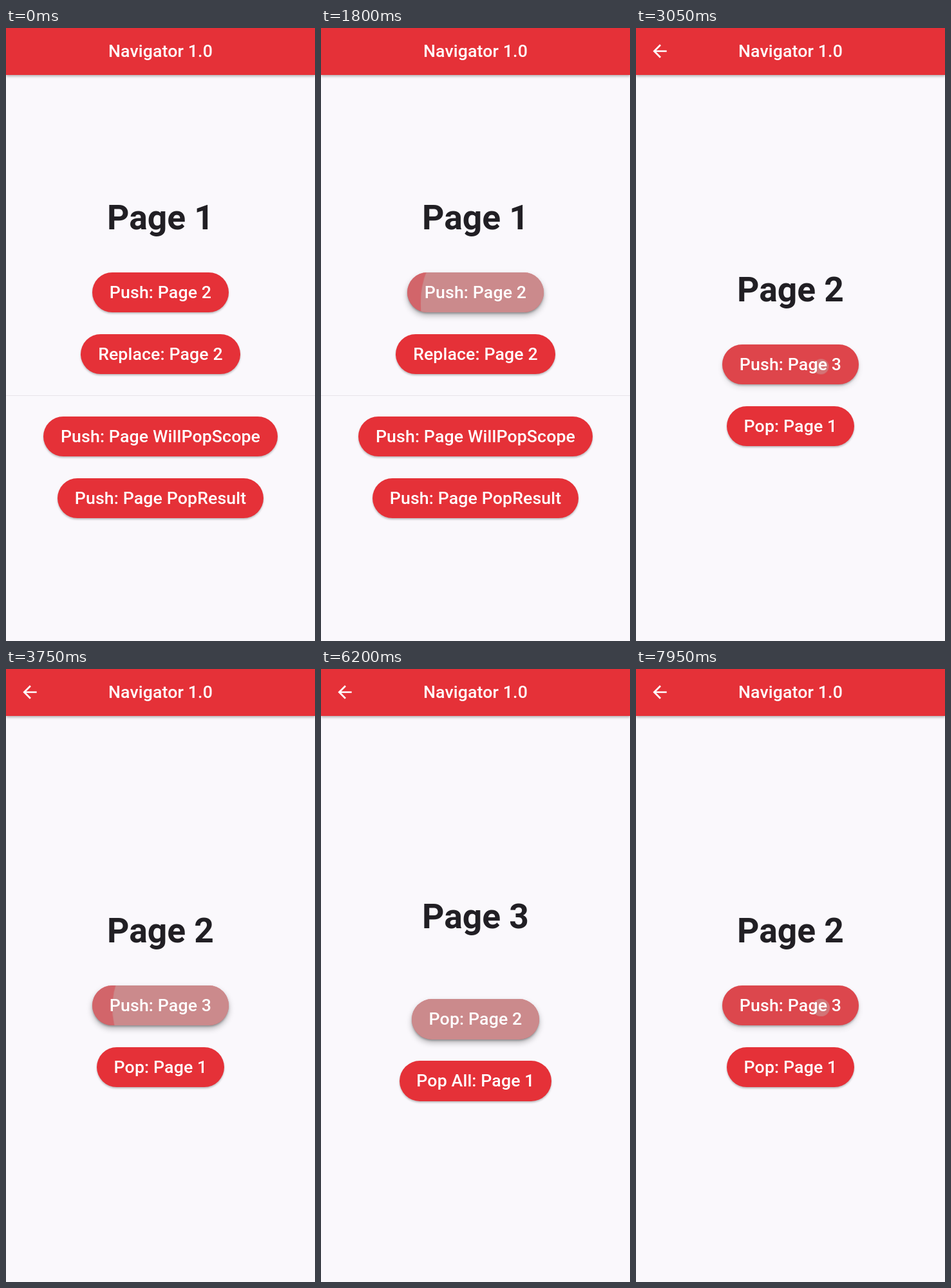
Recreate the animation shown at these times as an HTML page. Size 480 px wide and 953 px high, loop 8 s.

```html
<!DOCTYPE html>
<html lang="en">
<head>
<meta charset="utf-8">
<title>Navigator 1.0</title>
<style>
  :root { --red: #e53138; --paper: #faf8fc; --loop: 8s; }
  html, body { margin: 0; width: 100%; height: 100%; overflow: hidden; background: var(--paper); }
  .stage { position: relative; width: 480px; height: 953px; overflow: hidden; }
  .page { position: absolute; inset: 0; background: var(--paper); font: 500 26.67px/1.2 Roboto, sans-serif; letter-spacing: .133px; white-space: nowrap; }

  .bar {
    position: absolute; left: 0; right: 0; top: 0; height: 73px;
    background: var(--red); color: #fff; text-align: center; line-height: 73px;
    box-shadow: 0 1.5px 4px rgba(0, 0, 0, .3);
  }
  .bar svg { position: absolute; left: 21.4px; top: 20.3px; width: 32px; height: 32px; fill: #fff; }
  h1 {
    position: absolute; left: 0; right: 0; top: var(--y); margin: 0;
    text-align: center; color: #211f24;
    font-size: 53.33px; font-weight: 700; line-height: 62.5px; letter-spacing: 0;
  }
  hr { position: absolute; left: 0; right: 0; top: 570.5px; height: 1.3px; margin: 0; border: 0; background: #e7e4e9; }

  .btn {
    position: absolute; left: 0; right: 0; top: var(--y); width: fit-content; height: 62.6px;
    margin: 0 auto; padding: 0 26.67px; border-radius: 32px;
    background: var(--red); color: #fff; line-height: 62.6px;
    box-shadow: 0 2px 3px rgba(0, 0, 0, .25);
  }
  .btn span { position: relative; }
  .lift, .ink, .tint { position: absolute; inset: 0; border-radius: inherit; }
  .lift { box-shadow: 0 5px 10px rgba(0, 0, 0, .27); }
  .ink { overflow: hidden; }
  .tint { background: rgba(172, 210, 210, .33); }
  .splash {
    position: absolute; left: calc(var(--cx) - var(--r)); top: calc(var(--cy) - var(--r));
    width: calc(2 * var(--r)); height: calc(2 * var(--r));
    border-radius: 50%; background: rgba(190, 224, 217, .3);
  }

  /* Pressed look: highlight and raised shadow fade over 200 ms, splash grows for 1 s */
  .lift, .tint { animation: var(--hold) var(--loop) linear infinite; }
  .splash { animation: var(--grow) var(--loop) linear infinite, var(--fade) var(--loop) linear infinite; }
  .press-a { --hold: hold-a; --grow: grow-a; --fade: fade-a; --cx: 155.5px; --cy: 48px; --r: 164px; }
  .press-b { --hold: hold-b; --grow: grow-b; --fade: fade-b; --cx: 153.5px; --cy: 35px; --r: 157.4px; }
  .press-c { --hold: hold-c; --grow: grow-c; --fade: fade-c; --cx: 147px; --cy: 31px; --r: 153px; }

  @keyframes hold-a { 0%, 12.1875%, 28.35%, 100% { opacity: 0 } 14.6875%, 25.85% { opacity: 1 } }
  @keyframes grow-a { 0%, 12.1875% { transform: scale(0) } 24.6875%, 100% { transform: scale(1) } }
  @keyframes fade-a { 0%, 25.85% { opacity: 1 } 28.35%, 100% { opacity: 0 } }

  @keyframes hold-b {
    0%, 37.1875%, 53.375%, 98.3125% { opacity: 0 }
    39.6875%, 50.875% { opacity: 1 }
    100% { opacity: .675 }
  }
  @keyframes grow-b {
    0%, 37.1875%, 98.3125% { transform: scale(0) }
    49.6875%, 98.31% { transform: scale(1) }
    100% { transform: scale(.135) }
  }
  @keyframes fade-b { 0%, 50.875%, 98.3125%, 100% { opacity: 1 } 53.375%, 98.31% { opacity: 0 } }

  @keyframes hold-c { 0%, 65.3125%, 87.875%, 100% { opacity: 0 } 67.8125%, 85.375% { opacity: 1 } }
  @keyframes grow-c { 0%, 65.3125% { transform: scale(0) } 77.8125%, 100% { transform: scale(1) } }
  @keyframes fade-c { 0%, 85.375% { opacity: 1 } 87.875%, 100% { opacity: 0 } }

  /* Pages rise a quarter of the height while fading in, 300 ms; leaving plays it backwards */
  .two { animation: rise-2 var(--loop) linear infinite, show-2 var(--loop) linear infinite; }
  .three { animation: rise-3 var(--loop) linear infinite, show-3 var(--loop) linear infinite; }
  @keyframes rise-2 {
    0% { transform: translateY(25%) }
    25.85% { transform: translateY(25%); animation-timing-function: cubic-bezier(.4, 0, .2, 1) }
    29.6%, 100% { transform: none }
  }
  @keyframes show-2 {
    0% { opacity: 0 }
    25.85% { opacity: 0; animation-timing-function: ease-in }
    29.6%, 100% { opacity: 1 }
  }
  @keyframes rise-3 {
    0% { transform: translateY(25%) }
    50.875% { transform: translateY(25%); animation-timing-function: cubic-bezier(.4, 0, .2, 1) }
    54.625% { transform: none }
    85.375% { transform: none; animation-timing-function: cubic-bezier(.8, 0, .6, 1) }
    89.125%, 100% { transform: translateY(25%) }
  }
  @keyframes show-3 {
    0% { opacity: 0 }
    50.875% { opacity: 0; animation-timing-function: ease-in }
    54.625% { opacity: 1 }
    85.375% { opacity: 1; animation-timing-function: ease-out }
    89.125%, 100% { opacity: 0 }
  }
</style>
</head>
<body>
<div class="stage">
  <section class="page one">
    <div class="bar">Navigator 1.0</div>
    <h1 style="--y:263.5px">Page 1</h1>
    <div class="btn press-a" style="--y:379.8px">
      <div class="lift"></div>
      <div class="ink"><div class="tint"></div><div class="splash"></div></div>
      <span>Push: Page 2</span>
    </div>
    <div class="btn" style="--y:475.8px"><span>Replace: Page 2</span></div>
    <hr>
    <div class="btn" style="--y:603.8px"><span>Push: Page WillPopScope</span></div>
    <div class="btn" style="--y:699.8px"><span>Push: Page PopResult</span></div>
  </section>

  <section class="page two">
    <div class="bar">
      <svg viewBox="0 0 24 24"><path d="M20 11H7.83l5.59-5.59L12 4l-8 8 8 8 1.41-1.41L7.83 13H20z"/></svg>
      Navigator 1.0
    </div>
    <h1 style="--y:375.5px">Page 2</h1>
    <div class="btn press-b" style="--y:491.8px">
      <div class="lift"></div>
      <div class="ink"><div class="tint"></div><div class="splash"></div></div>
      <span>Push: Page 3</span>
    </div>
    <div class="btn" style="--y:587.8px"><span>Pop: Page 1</span></div>
  </section>

  <section class="page three">
    <div class="bar">
      <svg viewBox="0 0 24 24"><path d="M20 11H7.83l5.59-5.59L12 4l-8 8 8 8 1.41-1.41L7.83 13H20z"/></svg>
      Navigator 1.0
    </div>
    <h1 style="--y:354.2px">Page 3</h1>
    <div class="btn press-c" style="--y:513.2px">
      <div class="lift"></div>
      <div class="ink"><div class="tint"></div><div class="splash"></div></div>
      <span>Pop: Page 2</span>
    </div>
    <div class="btn" style="--y:609.2px"><span>Pop All: Page 1</span></div>
  </section>
</div>
</body>
</html>
```
